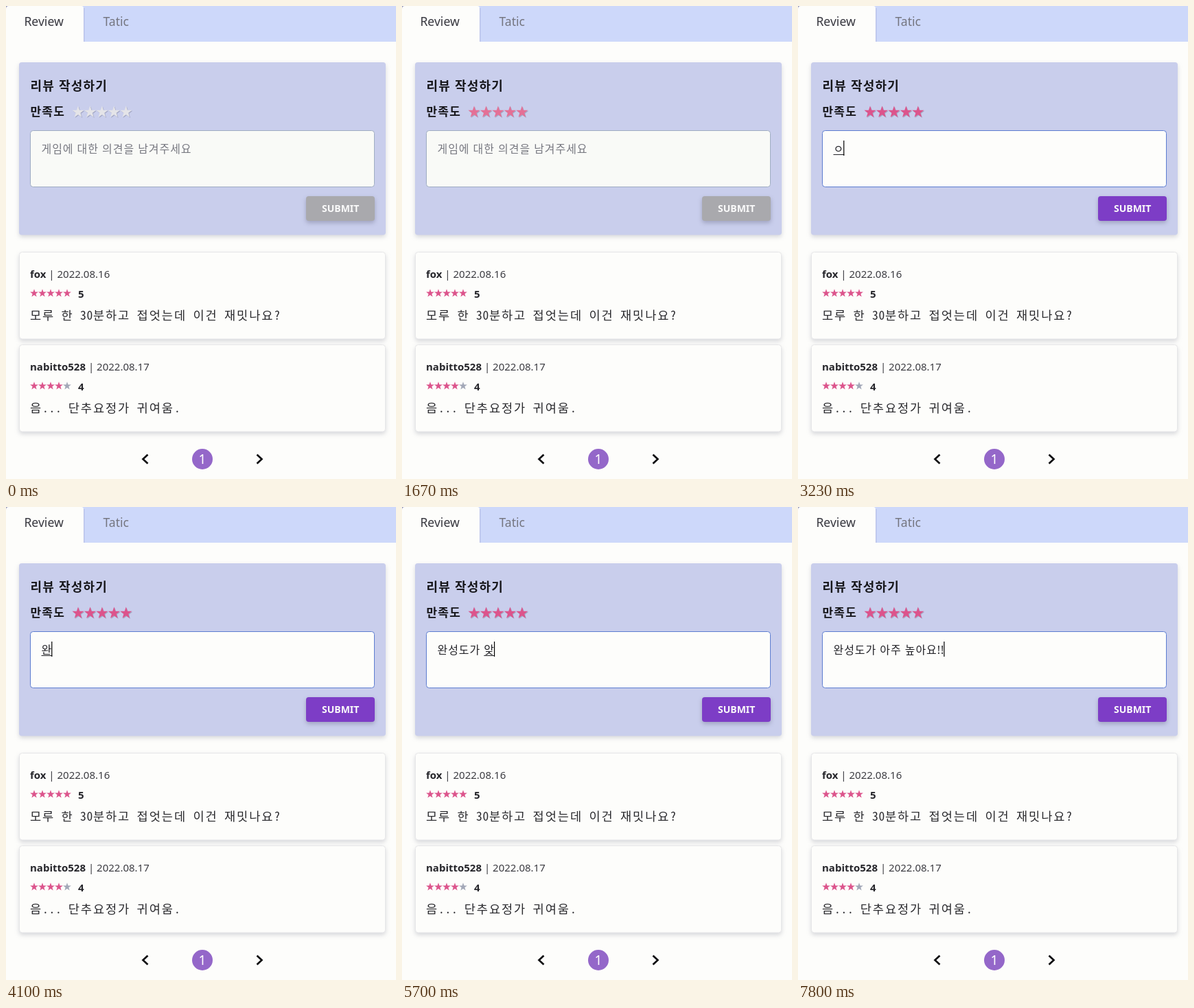
Write an HTML page that moves like this. It is 568 px wide and 689 px high and loops after 8 s.

```html
<!DOCTYPE html>
<html lang="ko">
<head>
<meta charset="utf-8">
<title>Review form</title>
<style>
  html, body { margin: 0; width: 100%; height: 100%; overflow: hidden; background: #fdfdfb; }
  svg { display: block; }
  text { font-family: "Noto Sans", "Noto Sans CJK KR", "Noto Sans CJK", sans-serif; white-space: pre; }
  .tab { font-size: 17.6px; }
  .head { font-weight: 700; fill: #17171b; }
  .meta { font-size: 15px; fill: #3c3c42; }
  .strong { font-weight: 600; fill: #26262b; }
  .field { font-size: 16px; letter-spacing: .95px; }
  .body { font-family: "Noto Sans Mono CJK KR", "Noto Sans CJK KR", "Noto Sans CJK", monospace; font-size: 17.6px; font-weight: 300; fill: #2a2a2e; }
  .panel { filter: drop-shadow(0 3px 3px rgba(110, 112, 130, .26)); }
  .raised { filter: drop-shadow(0 3px 3px rgba(70, 70, 100, .32)); }
</style>
</head>
<body>
<svg id="stage" width="568" height="689" viewBox="0 0 568 689">
  <rect width="568" height="689" fill="#fdfdfb"/>
  <rect width="568" height="52" fill="#cdd8fa"/>
  <path d="M0 52V0H110Q113 0 113 4V52Z" fill="#fdfdfb"/>
  <rect x="113" y="3" width="1.5" height="49" fill="#b9c3ea"/>
  <path d="M0 0H4Q0 0 0 4Z" fill="#8f90b4"/>
  <text class="tab" x="26.4" y="29" fill="#37373f">Review</text>
  <text class="tab" x="141.4" y="29" fill="#74757f">Tatic</text>

  <rect class="panel" x="19" y="82" width="534" height="251.5" rx="4" fill="#c9ceec"/>
  <text class="head" x="35.5" y="122.5" font-size="18" letter-spacing="1.2">리뷰 작성하기</text>
  <text class="head" x="35.5" y="160" font-size="17" letter-spacing="1.2">만족도</text>
  <g id="rating"></g>
  <rect id="box" x="35.5" y="181.5" width="501" height="82" rx="4"/>
  <text id="hint" class="field" x="51.5" y="213.5">게임에 대한 의견을 남겨주세요</text>
  <text id="input" class="field" x="51.5" y="213.5" fill="#232328"></text>
  <rect id="underline" y="216" height="1" fill="#232328"/>
  <rect id="caret" y="196" width="1.2" height="22" fill="#000"/>
  <rect id="button" class="raised" x="437" y="277" width="100" height="36" rx="4"/>
  <text x="487.2" y="300" font-size="14" font-weight="800" text-anchor="middle" fill="#fafafa">SUBMIT</text>

  <g id="reviews"></g>

  <g fill="none" stroke="#101012" stroke-width="2.7">
    <path d="M206.5 653.5L199.5 660L206.5 666.5"/>
    <path d="M365.5 653.5L372.5 660L365.5 666.5"/>
  </g>
  <circle cx="286" cy="660" r="15" fill="#9467c9"/>
  <text x="286" y="666.8" font-size="19" text-anchor="middle" fill="#fff">1</text>
</svg>
<script>
const NS = "http://www.w3.org/2000/svg";
const $ = id => document.getElementById(id);
const LOOP = 8000, BLINK = 540, FOCUS = 2360, LEFT = 51.5;

const PINK = [220, 84, 140], HOVER = [228, 112, 150], PALE = [228, 228, 232];
const rgb = c => `rgb(${c.map(Math.round).join()})`;
const mix = (a, b, k) => a.map((v, i) => v + (b[i] - v) * k);
const ramp = (t, from, to) => Math.min(1, Math.max(0, (t - from) / (to - from)));

function add(parent, tag, attrs, text) {
  const el = document.createElementNS(NS, tag);
  for (const k in attrs) el.setAttribute(k, attrs[k]);
  if (text) el.textContent = text;
  return parent.appendChild(el);
}

function star(parent, cx, cy, r, fill) {
  const points = Array.from({ length: 10 }, (_, i) => {
    const a = i * Math.PI / 5, d = i % 2 ? r * 0.4 : r;
    return (cx + d * Math.sin(a)).toFixed(2) + "," + (cy - d * Math.cos(a)).toFixed(2);
  });
  return add(parent, "polygon", { points: points.join(" "), fill });
}

// Fixed-pitch layout: Hangul takes a full cell, everything else half.
function cells(text, x) {
  return [...text].map(ch => {
    const at = x;
    x += ch >= "가" ? 18.1 : 9.4;
    return at.toFixed(1);
  }).join(" ");
}

function review(y, name, date, score, text) {
  const g = $("reviews");
  add(g, "rect", { class: "panel", x: 19.5, y: y + 0.5, width: 533, height: 126.5, rx: 4, fill: "#fdfdfb", stroke: "#e6e6e8" });
  const meta = add(g, "text", { class: "meta", x: 35, y: y + 38 });
  add(meta, "tspan", { class: "strong" }, name);
  add(meta, "tspan", {}, " | " + date);
  for (let i = 0; i < 5; i++) star(g, 41 + 12 * i, y + 60.5, 6.2, i < score ? rgb(PINK) : "#a3a8b8");
  add(g, "text", { class: "meta strong", x: 105, y: y + 67 }, String(score));
  add(g, "text", { class: "body", x: cells(text, 35), y: y + 99 }, text);
}

review(358, "fox", "2022.08.16", 5, "모루 한 30분하고 접엇는데 이건 재밋나요?");
review(493, "nabitto528", "2022.08.17", 4, "음... 단추요정가 귀여움.");

const rating = Array.from({ length: 5 }, (_, i) => star($("rating"), 105 + 17.45 * i, 154.6, 9));
$("rating").style.filter = "drop-shadow(1px 1px 0.6px rgba(110,112,140,.4))";

// Time, text, and whether the last syllable is still being composed.
const typing = [
  [3230, "ㅇ", 1], [3870, "오", 1], [3970, "와", 1], [4100, "완", 1],
  [4300, "완ㅅ", 1], [4400, "완서", 1], [4530, "완성", 1],
  [4670, "완성ㄷ", 1], [4730, "완성도", 1], [5000, "완성독", 1], [5200, "완성도가", 1],
  [5430, "완성도가 ", 0], [5530, "완성도가 ㅇ", 1], [5600, "완성도가 아", 1],
  [5700, "완성도가 앚", 1], [5800, "완성도가 아주", 1], [5970, "완성도가 아주 ", 0],
  [6300, "완성도가 아주 ㄴ", 1], [6400, "완성도가 아주 노", 1], [6530, "완성도가 아주 높", 1],
  [6730, "완성도가 아주 높ㅇ", 1], [6830, "완성도가 아주 높아", 1],
  [6930, "완성도가 아주 높앙", 1], [7070, "완성도가 아주 높아요", 1],
  [7470, "완성도가 아주 높아요!", 0], [7770, "완성도가 아주 높아요!!", 0]
];

function draw(t) {
  const focus = ramp(t, 2230, 2430);
  rating.forEach((el, i) => {
    const lit = i < 3 ? ramp(t, 1030, 1170) : ramp(t, 1500, 1670);
    el.setAttribute("fill", rgb(mix(mix(PALE, HOVER, lit), PINK, focus)));
  });
  $("box").setAttribute("fill", rgb(mix([249, 250, 247], [253, 253, 251], focus)));
  $("box").setAttribute("stroke", rgb(mix([158, 172, 194], [92, 124, 208], focus)));

  const [since, text, composing] = typing.filter(s => s[0] <= t).pop() || [FOCUS, "", 0];
  const input = $("input");
  if (input.textContent !== text) input.textContent = text;
  $("hint").setAttribute("fill", text ? "none" : "#777880");
  $("button").setAttribute("fill", text ? "#7d3dc6" : "#a9a9ad");

  const width = n => n ? input.getSubStringLength(0, n) : 0;
  const end = LEFT + width(text.length);
  const start = LEFT + width(Math.max(0, text.length - 1));
  $("underline").setAttribute("x", start);
  $("underline").setAttribute("width", composing ? end - start : 0);
  $("caret").setAttribute("x", end - 1);
  const shown = t >= FOCUS && (t - since) % (2 * BLINK) < BLINK;
  $("caret").setAttribute("opacity", shown ? 1 : 0);
}

function tick() {
  draw(performance.now() % LOOP);
  requestAnimationFrame(tick);
}
tick();
</script>
</body>
</html>
```
